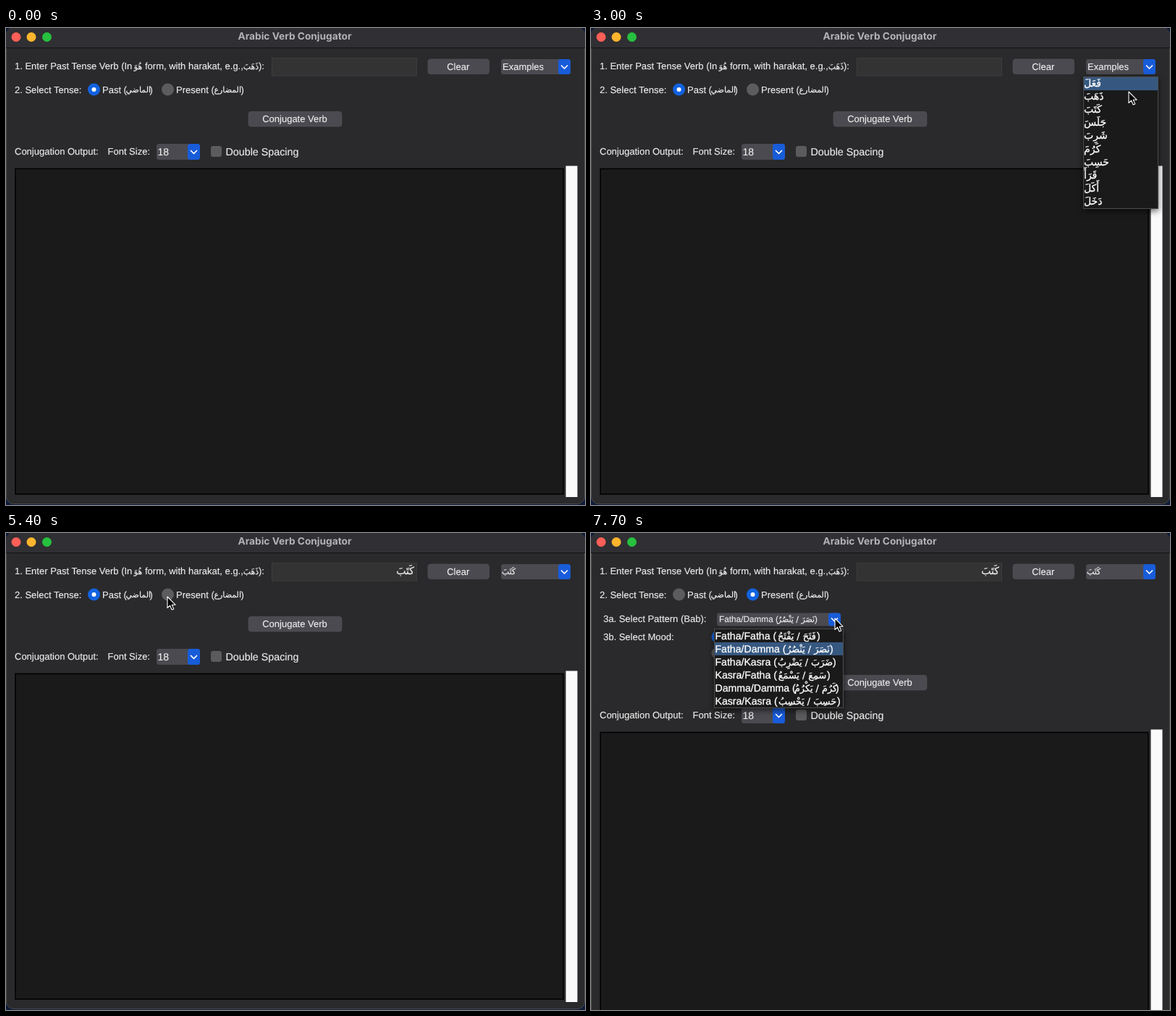
Recreate the animation shown at these times as an HTML page. Size 800 px wide and 659 px high, loop 8 s.

```html
<!DOCTYPE html>
<html lang="en">
<head>
<meta charset="utf-8">
<title>Arabic Verb Conjugator</title>
<style>
  html, body { margin: 0; width: 100%; height: 100%; overflow: hidden; background: #0d1a3a; }
  svg { display: block; width: 100vw; height: 100vh; }
  text {
    font: 13px "Liberation Sans", Arial, sans-serif; text-rendering: geometricPrecision;
    fill: #ececec; stroke: #ececec; stroke-width: .15px; white-space: pre;
  }
  .arabic { font-family: "DejaVu Sans", sans-serif; stroke-width: .25px; }
  .title { font: bold 13.7px Inter, sans-serif; fill: #b3b3b5; stroke: none; }
  .popup text { fill: #fff; stroke: #fff; stroke-width: .3px; }
  .popup { filter: drop-shadow(0 3px 4px #0009); }
</style>
</head>
<body>
<svg id="stage" viewBox="0 0 800 659"></svg>
<script>
const LOOP = 8000, STEP = 100;
const OPEN_EXAMPLES = 2300, PICK_VERB = 4300, PICK_PRESENT = 5500, OPEN_PATTERNS = 7700;
const EXTRA_HEIGHT = 81, ROW = 18.1;
const BUTTON = '#4b4a50', BLUE = '#185cd9', DARK = '#1a1a1a';

const VERB = 'كَتَبَ';
const VERBS = ['فَعَلَ', 'ذَهَبَ', VERB, 'جَلَسَ', 'شَرِبَ', 'كَرُمَ', 'حَسِبَ', 'قَرَأَ', 'أَكَلَ', 'دَخَلَ'];
// label, Arabic pair, x of the opening and closing ends of the pair
const PATTERNS = [
  ['Fatha/Fatha', 'فَتَحَ / يَفْتَحُ', 257, 312],
  ['Fatha/Damma', 'نَصَرَ / يَنْصُرُ', 270, 330],
  ['Fatha/Kasra', 'ضَرَبَ / يَضْرِبُ', 258, 334],
  ['Kasra/Fatha', 'سَمِعَ / يَسْمَعُ', 258, 326],
  ['Damma/Damma', 'كَرُمَ / يَكْرُمُ', 283, 338],
  ['Kasra/Kasra', 'حَسِبَ / يَحْسِبُ', 258, 340]
];
// pointer path: time, x, y
const PATH = [
  [1600, 803, 75], [1900, 778, 50], [2600, 778, 50], [3000, 743, 88], [3500, 718, 112],
  [4000, 712, 115], [4400, 710, 115], [5300, 223, 88], [5900, 223, 88], [6800, 337, 118]
];

const rect = (x, y, w, h, fill, r = 0, more = '') =>
  `<rect x="${x}" y="${y}" width="${w}" height="${h}" rx="${r}" fill="${fill}" ${more}/>`;
const circle = (x, y, r, fill) => `<circle cx="${x}" cy="${y}" r="${r}" fill="${fill}"/>`;
const text = (x, y, s, size = 13, anchor = 'start') =>
  `<text x="${x}" y="${y}" text-anchor="${anchor}" style="font-size:${size}px">${s}</text>`;
const arabic = (x, y, s, size = 11, anchor = 'middle') =>
  `<text class="arabic" x="${x}" y="${y - .5}" text-anchor="${anchor}" style="font-size:${size}px">${s}</text>`;
const group = (id, body, more = '') => `<g id="${id}" ${more}>${body}</g>`;

// Latin label followed by Arabic in brackets
const bilingual = (x, y, latin, word, from, to, size = 13, arabicSize = 11) =>
  text(x, y, latin + ' (', size) + arabic((from + to) / 2, y, word, arabicSize) + text(to, y, ')', size);

const button = (x, y, w, label) =>
  rect(x, y, w, 20.5, BUTTON, 3.5, 'stroke="#56555b" stroke-width=".6"') +
  text(x + w / 2 - .5, y + 14.7, label, 13, 'middle');
const combo = (x, y, w, h) => {
  const cx = x + w - 8.5, cy = y + h / 2 + .5;
  return rect(x, y, w, h, BUTTON, 3.5) + rect(x + w - 17, y, 17, h, BLUE, 3.5) +
    `<path d="M${cx - 4} ${cy - 2}l4 4l4 -4" fill="none" stroke="#fff" stroke-width="1.7" stroke-linecap="round" stroke-linejoin="round"/>`;
};
const radio = (x, y, on) =>
  circle(x, y, 8.5, on ? '#1262e0' : '#5c5c5e') + (on ? circle(x, y, 3, '#fff') : '');
const popupBox = (x, y, w, h) =>
  rect(x + .5, y + .5, w - 1, h - 1, DARK, 0, 'stroke="#4c4c4e"');

const header =
  rect(0, 0, 800, 27, '#302f33', 0, 'clip-path="url(#top)"') + rect(0, 27, 800, 1, '#121213') +
  circle(14, 12.5, 6.5, '#fe5f57') + circle(35, 12.5, 6.5, '#fdb52d') + circle(56.5, 12.5, 6.5, '#27c03f') +
  '<text class="title" x="399" y="16" text-anchor="middle">Arabic Verb Conjugator</text>';

const form =
  text(12, 57, '1. Enter Past Tense Verb (In ') + arabic(182.5, 57, 'هُوَ') +
  text(192, 57, 'form, with harakat, e.g., ') + arabic(338.5, 57, 'ذَهَبَ') + text(349, 57, '):') +
  rect(367.5, 41.5, 200, 24.5, '#333', 0, 'stroke="#3c3c3c"') +
  button(583, 43, 84.5, 'Clear') + combo(684, 43, 96, 21) +
  group('hint', text(686, 57.5, 'Examples')) +
  group('chosen', arabic(564, 57, VERB, 14, 'end') + arabic(685, 57, VERB, 11, 'start')) +
  text(12, 89.5, '2. Select Tense:') +
  group('pastOn', radio(121.5, 85, true) + radio(223.5, 85, false)) +
  group('presentOn', radio(121.5, 85, false) + radio(223.5, 85, true)) +
  bilingual(133, 89.5, 'Past', 'الماضي', 167, 198.5) +
  bilingual(235, 89.5, 'Present', 'المضارع', 288, 324.5);

const moodForm =
  text(17, 123, '3a. Select Pattern (Bab):') + text(17, 147.5, '3b. Select Mood:') +
  combo(174, 110.5, 171, 18) + bilingual(177, 123, 'Fatha/Damma', PATTERNS[1][1], 258, 309, 11.8, 11) +
  radio(175, 143.5, true) + bilingual(186.5, 148, 'Indicative', 'مرفوع', 249, 275.5) +
  radio(175, 166, false) + bilingual(186.5, 170.5, 'Subjunctive', 'منصوب', 261, 294);

const output =
  button(335, 115.5, 129, 'Conjugate Verb') +
  text(12, 174.5, 'Conjugation Output:') + text(140.5, 174.5, 'Font Size:') +
  combo(208, 160, 60, 22) + text(209.5, 175.5, '18', 14) +
  rect(283, 163, 15, 15, '#5b5b5e', 3) + text(303.5, 175.5, 'Double Spacing', 14.3) +
  rect(13, 194.5, 757, 449.5, DARK, 0, 'stroke="#000" stroke-width="1.5"') +
  rect(773.5, 190.5, 16, 457.5, '#fafafa');

const examplesPopup =
  popupBox(680, 67, 104, 183) + rect(681, 68, 102, ROW, '#365880', 0, 'id="highlight"') +
  VERBS.map((verb, i) => arabic(681, 81.5 + i * ROW, verb, 14, 'start')).join('');

const patternsPopup =
  popupBox(170, 132, 179, 110) + rect(171, 151, 177, 18, '#365880') +
  PATTERNS.map(([latin, pair, from, to], i) =>
    bilingual(171.5, 147 + i * 18, latin, pair, from, to, 14.1, 12.8)).join('');

const pointer =
  '<path d="M0 0V15.5L3.6 12.2L6.1 18L8.7 16.9L6.2 11.2H11Z" fill="#000" stroke="#fff" stroke-width="1.1" stroke-linejoin="round"/>';

document.getElementById('stage').innerHTML =
  '<clipPath id="top"><rect width="800" height="60" rx="9"/></clipPath>' +
  rect(.5, -.5, 799, 658, '#2a2a2c', 10, 'id="frame" stroke="#4b4b4e"') +
  header + form + group('mood', moodForm) + group('output', output) +
  group('examples', examplesPopup, 'class="popup"') +
  group('patterns', patternsPopup, 'class="popup"') + group('pointer', pointer);

const part = id => document.getElementById(id);
const show = (id, on) => part(id).style.display = on ? '' : 'none';

function pointerAt(t) {
  const next = PATH.findIndex(key => key[0] > t);
  if (next === 0) return PATH[0].slice(1);
  if (next < 0) return PATH[PATH.length - 1].slice(1);
  const [t0, x0, y0] = PATH[next - 1], [t1, x1, y1] = PATH[next];
  const u = (t - t0) / (t1 - t0), e = u * u * (3 - 2 * u);
  return [x0 + (x1 - x0) * e, y0 + (y1 - y0) * e];
}

function draw(t) {
  const picked = t >= PICK_VERB, present = t >= PICK_PRESENT;
  show('hint', !picked);
  show('chosen', picked);
  show('pastOn', !present);
  show('presentOn', present);
  show('mood', present);
  show('examples', t >= OPEN_EXAMPLES && !picked);
  show('patterns', t >= OPEN_PATTERNS);
  show('pointer', t > PATH[0][0]);

  const shift = present ? EXTRA_HEIGHT : 0;
  part('output').setAttribute('transform', `translate(0 ${shift})`);
  part('frame').setAttribute('height', 658 + shift);
  part('pointer').setAttribute('transform', `translate(${pointerAt(t)})`);

  // the highlighted row trails the pointer by one step
  const row = Math.max(0, Math.floor((pointerAt(t - STEP)[1] - 68) / ROW));
  part('highlight').setAttribute('y', 68 + row * ROW);
}

const start = performance.now();
function tick() {
  const t = (performance.now() - start) % LOOP;
  draw(Math.floor(t / STEP) * STEP);
  requestAnimationFrame(tick);
}
tick();
</script>
</body>
</html>
```
